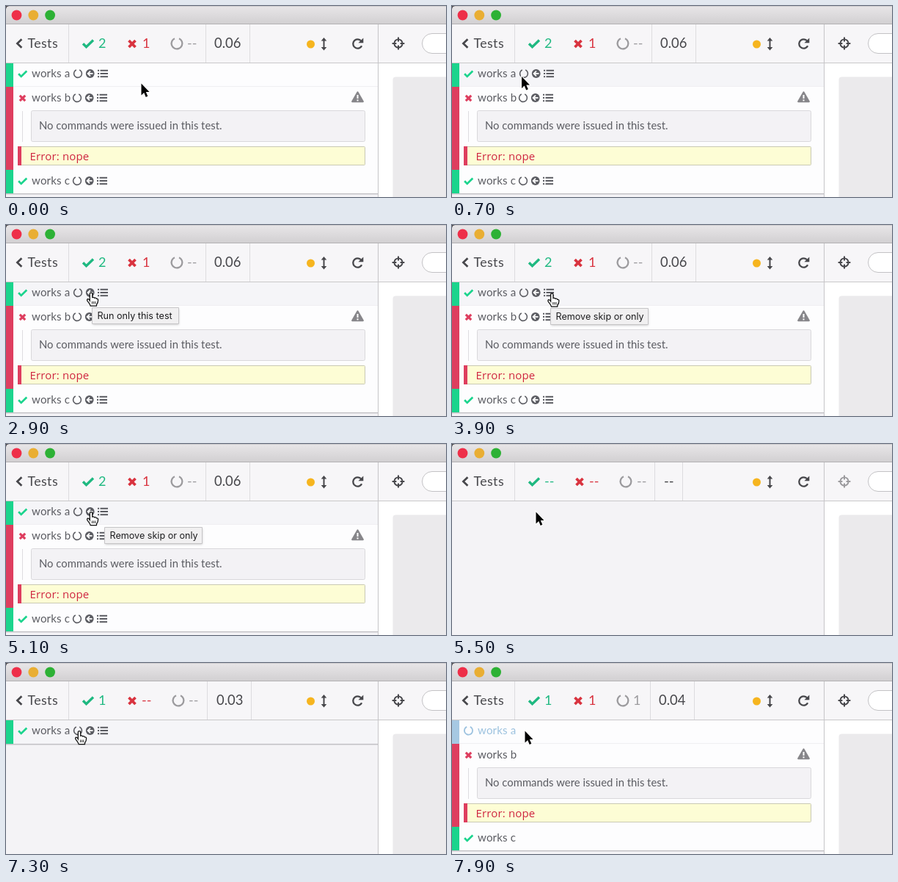
Write an HTML page with a canvas that moves like this. It is 600 by 260 pixels and loops after 8 s.

```html
<!DOCTYPE html>
<html lang="en">
<head>
<meta charset="utf-8">
<title>Test runner</title>
<style>
html, body { margin: 0; width: 100%; height: 100%; overflow: hidden; background: #f4f3f6; }
canvas { display: block; width: 600px; height: 260px; }
</style>
</head>
<body>
<canvas id="stage" width="600" height="260"></canvas>
<script>
const ctx = document.getElementById('stage').getContext('2d');
const LOOP = 8000, STEP = 100;
const GREEN = '#1fb981', RED = '#d9333f', GRAY = '#9c9b9e', DARK = '#47474b', INK = '#5b5c62';
const BAR = { pass: '#1bd48d', fail: '#de3e5f', skip: '#a6c8e2' };
const UI = 'Lato, "Open Sans", sans-serif';

// Toolbar contents; xs = fail icon, fail text, ring, pending text, divider, time, divider
const STATS = {
  full:  { pass: '2',  fail: '1',  pend: '--', time: '0.06', xs: [166, 186, 233, 247, 272, 284, 332] },
  blank: { pass: '--', fail: '--', pend: '--', time: '--',   xs: [168, 187, 237, 252, 276, 289, 314] },
  one:   { pass: '1',  fail: '--', pend: '--', time: '0.03', xs: [166, 185, 235, 249, 274, 287, 334] },
  skip:  { pass: '1',  fail: '1',  pend: '1',  time: '0.04', xs: [166, 186, 233, 247, 270, 282, 330] }
};

// Pointer keys: time, x, y
const PATH = [
  [0, 184.5, 105.5], [700, 95, 96], [800, 95, 96], [1200, 97, 91.5],
  [2100, 97, 91.5], [2500, 116, 92], [3000, 116, 92], [3500, 136.3, 93],
  [4600, 136.3, 93], [5000, 116, 92.5], [5300, 116, 92.5], [5400, 114.5, 92.5],
  [6700, 114.5, 92.5], [7100, 100, 92.5], [7400, 100, 92.5], [7500, 99.5, 92.5], [LOOP, 99.5, 92.5]
];

// Tooltips: text, left, top, width, fade in start/end, fade out start/end
const TIPS = [
  ['Skip this test', 96, 112, 93, 1900, 2000, 2400, 2600],
  ['Run only this test', 117, 112, 119, 2500, 2700, 3600, 3900],
  ['Remove skip or only', 134, 113, 134, 3600, 3900, 5200, 5400]
];

const clamp = v => Math.max(0, Math.min(1, v));
const ease = v => v * v * (3 - 2 * v);

function rect(x, y, w, h, color) {
  ctx.fillStyle = color;
  ctx.fillRect(x, y, w, h);
}

function box(x, y, w, h, r, fill, edge) {
  ctx.beginPath();
  ctx.roundRect(x + .5, y + .5, w - 1, h - 1, r);
  ctx.fillStyle = fill;
  ctx.fill();
  if (edge) {
    ctx.strokeStyle = edge;
    ctx.lineWidth = 1;
    ctx.stroke();
  }
}

function disc(x, y, r, color) {
  ctx.beginPath();
  ctx.arc(x, y, r, 0, 7);
  ctx.fillStyle = color;
  ctx.fill();
}

function text(s, x, y, size, color, family = UI, spacing = 0) {
  ctx.font = `${size}px ${family}`;
  ctx.letterSpacing = spacing + 'px';
  ctx.fillStyle = color;
  ctx.fillText(s, x, y);
}

function trace(points) {
  ctx.beginPath();
  for (let i = 0; i < points.length; i += 2) ctx.lineTo(points[i], points[i + 1]);
}

function line(points, width, color) {
  trace(points);
  ctx.strokeStyle = color;
  ctx.lineWidth = width;
  ctx.stroke();
}

function fillShape(points, color) {
  trace(points);
  ctx.fillStyle = color;
  ctx.fill();
}

function at(x, y, scale, draw) {
  ctx.save();
  ctx.translate(x, y);
  ctx.scale(scale, scale);
  draw();
  ctx.restore();
}

// Icons, centred on x, y
const check = (x, y, s, color) => at(x, y, s, () => line([-7, -.3, -2.5, 4.2, 7, -5], 3.4, color));

const cross = (x, y, s, color) => at(x, y, s, () => {
  line([-4.5, -4.5, 4.5, 4.5], 3.8, color);
  line([4.5, -4.5, -4.5, 4.5], 3.8, color);
});

function ring(x, y, r, width, color) {
  ctx.beginPath();
  ctx.arc(x, y, r, -Math.PI / 2 + .42, Math.PI * 1.5 - .42);
  ctx.strokeStyle = color;
  ctx.lineWidth = width;
  ctx.stroke();
}

function rowIcons(x, y) {
  ring(x, y, 5.4, 1.6, INK);
  disc(x + 16.7, y, 5.9, INK);
  line([x + 20.5, y, x + 13.8, y], 1.8, '#fff');
  line([x + 17, y - 3.4, x + 13.6, y, x + 17, y + 3.4], 1.8, '#fff');
  for (const dy of [-4.2, 0, 4.2]) {
    rect(x + 27, y + dy - 1, 2, 2, INK);
    rect(x + 30.5, y + dy - 1, 10.5, 2, INK);
  }
}

function reload(x, y) {
  ctx.beginPath();
  ctx.arc(x, y, 6.2, .45, Math.PI * 1.76);
  ctx.strokeStyle = DARK;
  ctx.lineWidth = 2.3;
  ctx.stroke();
  fillShape([x + 7.8, y - 8, x + 7.8, y - 1.2, x + 1, y - 1.2], DARK);
}

function target(x, y, color) {
  ctx.beginPath();
  ctx.arc(x, y, 5.6, 0, 7);
  ctx.strokeStyle = color;
  ctx.lineWidth = 1.9;
  ctx.stroke();
  for (let i = 0; i < 4; i++) {
    const dx = [1, 0, -1, 0][i], dy = [0, 1, 0, -1][i];
    line([x + dx * 2.6, y + dy * 2.6, x + dx * 8.4, y + dy * 8.4], 2, color);
  }
}

function warning(x, y) {
  ctx.lineJoin = 'round';
  fillShape([x, y - 6.5, x + 7.2, y + 6, x - 7.2, y + 6], '#87868a');
  ctx.closePath();
  ctx.strokeStyle = '#87868a';
  ctx.lineWidth = 2.4;
  ctx.stroke();
  ctx.lineJoin = 'miter';
  rect(x - 1, y - 3, 2, 5, '#fff');
  rect(x - 1, y + 3.4, 2, 2, '#fff');
}

function titleBar() {
  const g = ctx.createLinearGradient(0, 0, 0, 24);
  g.addColorStop(0, '#e8e6e8');
  g.addColorStop(1, '#d2d0d2');
  rect(0, 0, 600, 24, g);
  rect(0, 0, 600, 1, '#cfcdcf');
  fillShape([0, 0, 4, 0, 1.2, 1.2, 0, 4], '#4c4a4c');
  rect(0, 24, 600, 1, '#b3b1b3');
  const lights = ['#ee2f49', '#e9ae33', '#2db135'];
  lights.forEach((color, i) => disc(14.5 + i * 22.8, 12.5, 6.9, color));
}

function toolbar(stats, ready) {
  const [failX, failText, ringX, pendText, div1, timeX, div2] = stats.xs;
  rect(0, 25, 600, 52, '#f7f6f8');
  rect(0, 77, 600, 1, '#c9c8ca');
  for (const x of [85, div1, div2]) rect(x, 25, 1, 52, '#dddcdf');

  line([21.4, 45.3, 15.4, 51, 21.4, 56.7], 2.7, DARK);
  text('Tests', 29.5, 56.7, 17.8, DARK, UI, .4);
  check(112, 51.5, 1, GREEN);
  text(stats.pass, 126, 57, 18, GREEN);
  cross(failX + 6, 51.5, 1, RED);
  text(stats.fail, failText, 57, 18, RED);
  ring(ringX, 51, 7.4, 2.3, GRAY);
  text(stats.pend, pendText, 57, 18, GRAY);
  text(stats.time, timeX, 56.5, 18.4, DARK);

  disc(415.5, 52, 5.5, '#f6b51f');
  line([433.5, 46, 433.5, 58], 2, DARK);
  fillShape([433.5, 43, 437.3, 47.6, 429.7, 47.6], DARK);
  fillShape([433.5, 60.5, 437.3, 56, 429.7, 56], DARK);
  reload(479.5, 51.5);
  target(535, 51, ready ? DARK : GRAY);
  box(567, 37, 60, 28, 13.5, '#fff', '#c3c2c5');
}

function preview() {
  rect(508, 78, 92, 182, '#fff');
  box(527, 96, 90, 200, 4, '#ebeaec');
  rect(507, 25, 1, 235, '#c6c5c8');
}

function row(name, y, kind, iconX) {
  if (kind === 'pass') check(22.7, y + .5, .8, BAR.pass);
  if (kind === 'fail') cross(22.5, y + .5, .82, BAR.fail);
  if (kind === 'skip') ring(22.5, y, 5.6, 1.8, '#9cc2df');
  text(name, 35, y + 5, 15.1, kind === 'skip' ? '#9cc2df' : INK, UI, .15);
  if (iconX) rowIcons(iconX, y);
}

function listEnd(y) {
  rect(0, y, 507, 1, '#c3c2c6');
  rect(0, y + 1, 507, 1, '#dddce0');
}

function firstRow(kind, icons, hover) {
  rect(0, 78, 507, 32, hover ? '#f5f5f8' : '#fdfdfe');
  rect(10, 109, 497, 1, '#f0eff2');
  rect(0, 78, 10, 32, BAR[kind]);
  row('works a', 92, kind, icons && 98);
}

function fullList(kind, icons, hover) {
  rect(0, 78, 507, 178, '#fdfdfe');
  firstRow(kind, icons, hover);
  rect(0, 110, 10, 113, BAR.fail);
  rect(0, 223, 10, 33, BAR.pass);
  row('works b', 125, 'fail', icons && 97);
  warning(479.5, 124);
  rect(22, 143, 1, 42, '#dedde0');
  box(34, 142, 456, 43, 2, '#f3f2f5', '#d9d8db');
  text('No commands were issued in this test.', 45, 167.5, 14.85, INK);
  box(16, 191, 474, 26, 1, '#fdfdd5', '#c9c9b4');
  rect(16, 191, 5, 26, BAR.fail);
  text('Error: nope', 32.5, 209.5, 15, '#cf2440', '"Open Sans", sans-serif', .15);
  row('works c', 238, 'pass', icons && 97);
  listEnd(255);
}

function tooltip([label, x, y, w, in0, in1, out0, out1], t) {
  const alpha = clamp((t - in0) / (in1 - in0)) * (1 - clamp((t - out0) / (out1 - out0)));
  if (!alpha) return;
  ctx.save();
  ctx.globalAlpha = alpha;
  ctx.shadowColor = 'rgba(0,0,0,.25)';
  ctx.shadowBlur = 3;
  ctx.shadowOffsetY = 1;
  box(x, y, w, 23, 0, '#f1f0f1');
  ctx.shadowColor = 'transparent';
  box(x, y, w, 23, 0, '#f1f0f1', '#c6c5c7');
  text(label, x + 7.5, y + 16.3, 12.6, '#1c1c1e', 'Inter, Roboto, sans-serif');
  ctx.restore();
}

function arrow() {
  const shape = [0, 0, 0, 16, 3.7, 12.6, 6.2, 18.4, 8.8, 17.3, 6.3, 11.6, 11, 11.6];
  trace(shape);
  ctx.closePath();
  ctx.strokeStyle = '#fff';
  ctx.lineWidth = 2;
  ctx.stroke();
  fillShape(shape, '#000');
}

function hand() {
  ctx.beginPath();
  ctx.moveTo(-1.7, 11);
  ctx.lineTo(-1.7, 1.8);
  ctx.bezierCurveTo(-1.7, -.4, 1.7, -.4, 1.7, 1.8);
  ctx.lineTo(1.7, 6.6);
  ctx.quadraticCurveTo(4, 5.8, 4.6, 7.4);
  ctx.quadraticCurveTo(6.8, 6.6, 7.3, 8.4);
  ctx.quadraticCurveTo(9.6, 8, 9.6, 10.2);
  ctx.quadraticCurveTo(9.6, 13.6, 7.6, 16);
  ctx.lineTo(7.4, 18.2);
  ctx.lineTo(-.8, 18.2);
  ctx.quadraticCurveTo(-1.4, 15.8, -5, 11.4);
  ctx.quadraticCurveTo(-6, 9.4, -4.3, 8.7);
  ctx.quadraticCurveTo(-3, 8.6, -1.7, 11);
  ctx.closePath();
  ctx.fillStyle = '#fff';
  ctx.fill();
  ctx.strokeStyle = '#111';
  ctx.lineWidth = 1.3;
  ctx.stroke();
  for (const x of [1.5, 3.6, 5.7]) line([x, 12, x, 15.5], .9, '#111');
}

function pointer(t) {
  const i = PATH.findIndex(key => key[0] > t);
  const [t0, x0, y0] = PATH[i - 1], [t1, x1, y1] = PATH[i];
  const k = ease((t - t0) / (t1 - t0));
  const isHand = (t >= 1000 && t < 5400) || (t >= 6800 && t < 7500);
  at(x0 + (x1 - x0) * k, y0 + (y1 - y0) * k, 1, isHand ? hand : arrow);
}

function draw(t) {
  const phase = t < 5400 ? 'full' : t < 5600 ? 'blank' : t < 7500 ? 'one' : t < 7800 ? 'blank' : 'skip';
  const ready = t < 5400 || (t >= 5700 && t < 7500) || t >= 7800;
  rect(0, 0, 600, 260, '#f4f3f6');
  toolbar(STATS[phase], ready);
  titleBar();
  if (phase === 'full') fullList('pass', true, t >= 200);
  if (phase === 'skip') fullList('skip', false, false);
  if (phase === 'one') {
    firstRow('pass', t >= 5900, true);
    listEnd(110);
  }
  preview();
  for (const tip of TIPS) tooltip(tip, t);
  pointer(t);
}

const start = performance.now();
function tick() {
  const t = (performance.now() - start) % LOOP;
  draw(Math.floor(t / STEP) * STEP);
  requestAnimationFrame(tick);
}
tick();
</script>
</body>
</html>
```
